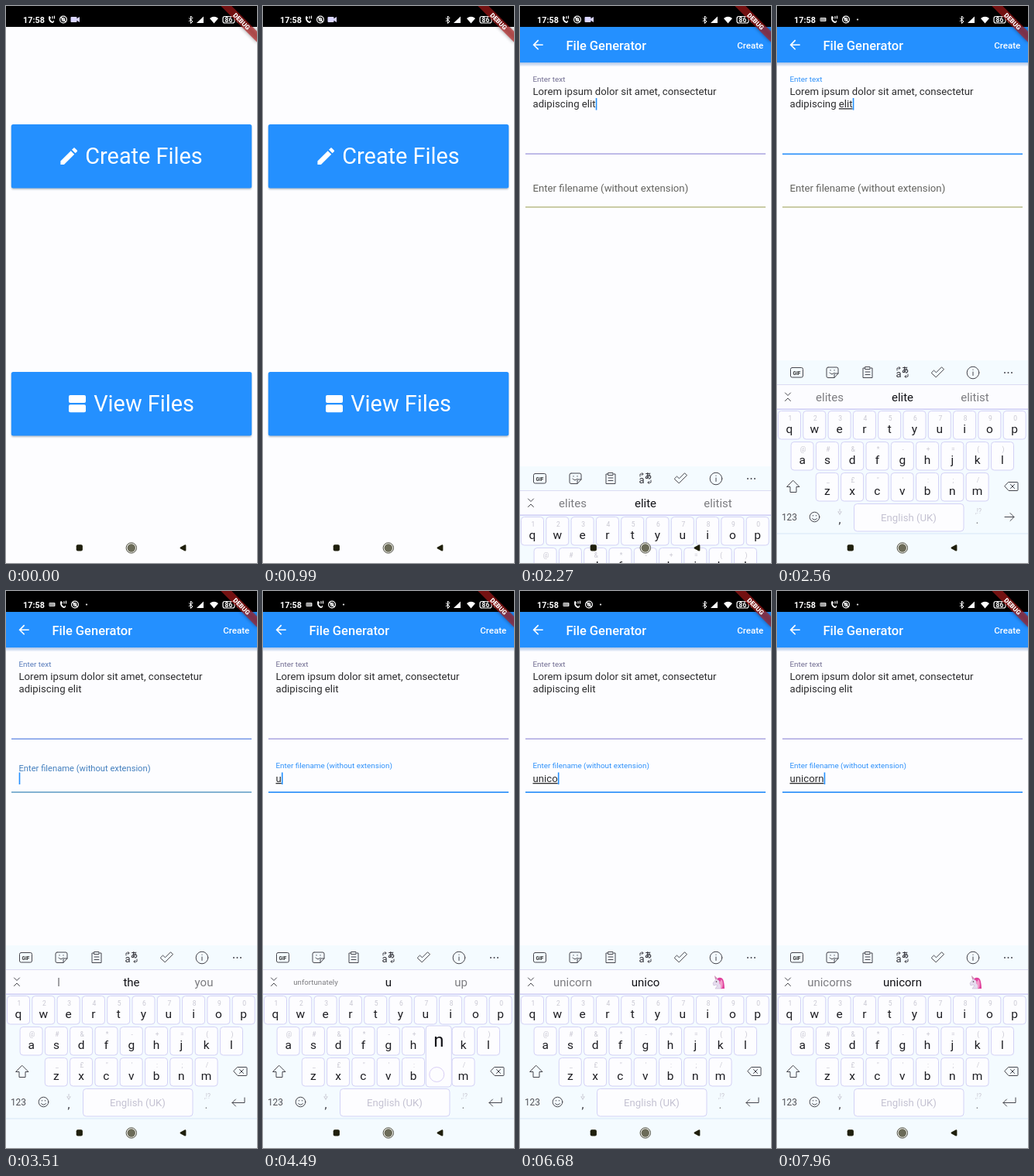
Animation, 324 px wide and 720 px high, one loop 8 s. Source, as an HTML page:

```html
<!DOCTYPE html>
<html lang="en">
<head>
<meta charset="utf-8">
<title>File Generator</title>
<style>
html, body { margin: 0; width: 100%; height: 100%; overflow: hidden; background: #fdfdff; }
svg { display: block; width: 100vw; height: 100vh; font-family: Roboto, "Noto Sans", sans-serif; }
text { white-space: pre; }
.mid { text-anchor: middle; }
.line { fill: none; stroke: #45454c; stroke-width: 1; stroke-linecap: round; stroke-linejoin: round; }
.key { fill: #fdfdff; stroke: #d3d2f6; stroke-width: 1; }
.hint { fill: #c8c7d2; font-size: 8.5px; text-anchor: middle; }
.letter { fill: #1d1d22; font-size: 15.5px; text-anchor: middle; }
.under { text-decoration: underline; text-decoration-thickness: 1px; }
</style>
</head>
<body>
<svg id="stage" viewBox="0 0 324 720" xmlns="http://www.w3.org/2000/svg"></svg>
<script>
const LOOP = 8000;
const BLUE = '#2490ff', PAPER = '#fdfdff';
const PAGE_IN = 2190, KEYS_IN = 2228, FOCUS_TEXT = 2320, COMPOSE = 2420, FOCUS_NAME = 3450;
const STEP_MS = 40, RISE_MS = 145;
const NAME = 'unicorn';
const TYPED = [4250, 4560, 5100, 5650, 6250, 6850, 7520];
const PRESS = 110, SUGGEST_LAG = 80;
const HORN = '*';
const WORDS = [
  ['I', 'the', 'you'], ['unfortunately', 'u', 'up'], ['unfortunately', 'un', 'until'],
  ['unicorn', 'uni', HORN], ['unicorn', 'unic', HORN], ['unicorn', 'unico', HORN],
  ['unicorn', 'unicor', HORN], ['unicorns', 'unicorn', HORN]
];
const ROWS = [
  { x: 16, y: 523, keys: 'qwertyuiop', hints: '1234567890' },
  { x: 32.6, y: 563, keys: 'asdfghjkl', hints: '@#&*-+=()' },
  { x: 64.8, y: 603, keys: 'zxcvbnm', hints: '_£"\':;/' }
];
const PITCH = 32.3;

const at = (x, y, body, s = 1) => `<g transform="translate(${x} ${y}) scale(${s})">${body}</g>`;
const text = (x, y, size, fill, str, more = '') =>
  `<text x="${x}" y="${y}" font-size="${size}" fill="${fill}" ${more}>${str}</text>`;
const rect = (x, y, w, h, fill, r = 0, more = '') =>
  `<rect x="${x}" y="${y}" width="${w}" height="${h}" fill="${fill}" rx="${r}" ${more}/>`;
const line = d => `<path class="line" d="${d}"/>`;
const clamp = v => Math.max(0, Math.min(1, v));
const mix = (a, b, k) => a + (b - a) * k;
const blend = (a, b, k) => `rgb(${a.map((v, i) => Math.round(mix(v, b[i], k)))})`;

function bigButton(y, icon, textX, label) {
  return rect(7, y + 1.5, 310, 82.5, '#7d8793', 2, 'opacity=".55" filter="url(#soft)"') +
    rect(6.8, y, 310.4, 82.5, BLUE, 2.5) + icon +
    text(textX, y + 51, 28.875, '#fff', label);
}

function home() {
  const pencil = '<path fill="#fff" d="M3 17.25V21h3.75L17.81 9.94l-3.75-3.75L3 17.25zM20.71 7.04c.39-.39.39-1.02 0-1.41l-2.34-2.34c-.39-.39-1.02-.39-1.41 0l-1.83 1.83 3.75 3.75 1.83-1.83z"/>';
  const stack = rect(81, 503, 22, 10, '#fff', 2) + rect(81, 515.2, 22, 10, '#fff', 2);
  return bigButton(153, at(66.8, 179.7, pencil, 1.203), 102.3, 'Create Files') +
    bigButton(473, stack, 113.2, 'View Files');
}

function form() {
  const back = '<path fill="#fff" d="M20 11H7.83l5.59-5.59L12 4l-8 8 8 8 1.41-1.41L7.83 13H20v-2z"/>';
  return rect(0, 27, 324, 693, PAPER) +
    rect(0, 73, 324, 5.5, 'url(#shade)') + rect(0, 27, 324, 46, BLUE) +
    at(13.2, 40.3, back, .825) +
    text(59.4, 56.5, 16.5, '#fff', 'File Generator', 'font-weight="500"') +
    text(314.2, 54.5, 11.55, '#fff', 'Create', 'font-weight="500" text-anchor="end"') +
    text(16.5, 98, 9.9, '#000', 'Enter text', 'id="label1"') +
    text(16.5, 115.4, 13.2, '#2c2c2e', 'Lorem ipsum dolor sit amet, consectetur') +
    text(16.5, 131.2, 13.2, '#2c2c2e', 'adipiscing <tspan id="elit">elit</tspan>', 'id="body"') +
    rect(7, 190.5, 310, 1.3, '#000', 0, 'id="rule1"') +
    text(16.5, 240, 13.2, '#000', 'Enter filename (without extension)', 'id="label2"') +
    text(16.5, 247, 13.2, '#2c2c2e', '', 'id="name" class="under"') +
    rect(7, 259.3, 310, 1.3, '#000', 0, 'id="rule2"') +
    rect(0, 0, 1.6, 15.5, BLUE, 0, 'id="caret"');
}

function toolbar() {
  return '<rect class="line" x="17.5" y="467.5" width="16" height="12.5" rx="2"/>' +
    text(25.5, 476.6, 6.5, '#333', 'GIF', 'class="mid" font-weight="700"') +
    line('M66 467h11q2 0 2 2v6l-5 5.5h-8q-2 0-2-2v-9.5q0-2 2-2M79 475h-4q-1 0-1 1v4.5M68 474q3 4 6 0M69 470.5v.6M74 470.5v.6') +
    line('M113 468h-2v12.5h12v-12.5h-2M114 466.5h6v3h-6zM114 473h6M114 476.5h6') +
    text(153.5, 480, 13, '#33333a', 'a') +
    text(161, 473.5, 9, '#33333a', 'あ', 'font-family="Noto Sans CJK JP, Roboto, sans-serif" font-weight="700"') +
    line('M155 471v-3h4M157.5 466.5l1.5 1.5-1.5 1.5M169 476v3h-4M166.5 477.5l-1.5 1.5 1.5 1.5') +
    line('M199.5 474l3-3 3 2.8 7-7 3 2.8-10 10z') +
    '<circle class="line" cx="253" cy="474" r="7.8"/>' + line('M253 473v4.5M253 470v.3') +
    [294, 298.5, 303].map(x => `<circle cx="${x}" cy="474" r="1" fill="#45454c"/>`).join('');
}

function keyCap(x, y, letter, hint) {
  return `<rect class="key" x="${x - 14.5}" y="${y + .5}" width="29" height="36.5" rx="4"/>` +
    `<text class="hint" x="${x + 1}" y="${y + 13}">${hint.replace('&', '&amp;')}</text>` +
    `<text class="letter" x="${x}" y="${y + 29}">${letter}</text>`;
}

function unicorn() {
  return '<g transform="translate(256 506) scale(-1 1)">' +
    '<path fill="#e6dcef" stroke="#b9a6c8" stroke-width=".5" d="M-2-5L3-4 7 1 6 4 3 3 1 4 4 8H-5z"/>' +
    '<path fill="#e0409c" d="M0-6Q-6-7-7-1-8 4-8 8H-3Q-5 3-1 1-3-2 2-4z"/>' +
    '<path fill="#f29ac9" d="M-4-4Q-7 0-5 7L-3 8Q-4 3-1 1z"/>' +
    '<path fill="#c98ab0" d="M1-5L5-9 4-4z"/><circle cx="2.5" cy="-1" r=".8" fill="#433"/></g>';
}

function keyboard() {
  const keys = ROWS.map(r => [...r.keys].map((k, i) => keyCap(r.x + PITCH * i, r.y, k, r.hints[i])).join('')).join('');
  return rect(0, 458, 324, 600, '#f4fbff') +
    rect(0, 490, 324, 31, '#fcfcff') +
    rect(0, 489, 324, 1, '#dcdcf3') + rect(0, 520.5, 324, 1.3, '#c9c6f3') +
    toolbar() + line('M10.5 500l3.5 3.5 3.5-3.5M10.5 510.5l3.5-3.5 3.5 3.5') +
    [68, 162, 255.5].map((x, i) => text(x, 0, 15, i === 1 ? '#111116' : '#7c7c80', '', `id="word${i}" class="mid"`)).join('') +
    `<g id="horn">${unicorn()}</g>` + keys +
    line('M21 613.5l8 8h-4v7h-8v-7h-4z') +
    line('M299 615.5h11q1 0 1 1v9q0 1-1 1h-11l-5-5.5zM301.5 618.5l5 5M306.5 618.5l-5 5') +
    text(16, 665, 12, '#505056', '123', 'class="mid"') +
    '<circle class="line" cx="48.5" cy="660.5" r="6.3"/>' + line('M45.5 662.5q3 3.5 6 0M46.5 658.5v.5M50.5 658.5v.5') +
    '<path d="M81 650v4M79 653q0 3 2 3t2-3M81 656v2" fill="none" stroke="#c8c7d2"/>' +
    text(81, 669, 15, '#33333a', ',', 'class="mid"') +
    '<rect class="key" x="99.5" y="643.5" width="141.5" height="35.5" rx="4"/>' +
    text(170, 665.5, 13.2, '#c4c2d2', 'English (UK)', 'class="mid"') +
    '<text class="hint" x="260" y="656">,!?</text>' + text(258.5, 669, 15, '#77777d', '.', 'class="mid"') +
    `<g id="next">${line('M294 660.5h12M301 655.5l5 5-5 5')}</g>` +
    `<g id="enter">${line('M308 655v6.5h-16M296.5 657l-4.5 4.5 4.5 4.5')}</g>` +
    rect(0, 681.5, 324, 1, '#d8e8f8') +
    '<g id="popup"><rect class="key" x="-16.5" y="-41" width="33" height="79" rx="4"/>' +
    '<circle cx="-2.5" cy="22" r="9.5" fill="#fdfdff" stroke="#d9cff6"/>' +
    '<text id="pressed" class="mid" y="-14" font-size="24" fill="#111116"></text></g>';
}

function statusBar() {
  const ink = 'fill="none" stroke="#fff" stroke-width="1.2" stroke-linecap="round"';
  const call = '<path fill="none" stroke="#fff" stroke-width="1.9" stroke-linecap="round" d="M-3-3.2q-.5 5.5 4 6.700"/>' +
    `<path ${ink} d="M-2.500-3.500l1 1.500M2 3.500l.500-1.700M1-4v2.500M3.500-4.500v3"/>`;
  const swirl = `<circle r="4.4" ${ink}/><circle r="1.8" ${ink}/><path ${ink} d="M-3-3L3 3"/>`;
  const cam = rect(-5.5, -3.5, 8, 7, '#d9d5ff', 1) + '<path fill="#d9d5ff" d="M2-1l4-2.5v7L2 1z"/>';
  const board = rect(-4, -2.5, 8, 5, '#d8d8d8', 1) + '<path stroke="#111" stroke-dasharray="1 1" d="M-3-.8h6M-3 .9h6"/>';
  return rect(0, 0, 324, 27, '#000') +
    text(22, 21.8, 10.8, '#fff', '17:58', 'font-weight="700"') +
    `<g id="idle">${at(59, 17.5, call) + at(74, 17.5, swirl) + at(89, 17.5, cam)}</g>` +
    `<g id="typing">${at(59.5, 17.5, board) + at(74, 17.5, call) + at(89, 17.5, swirl)}<circle cx="104" cy="17.5" r="1.1" fill="#fff"/></g>` +
    '<path fill="none" stroke="#fff" d="M236 15.5l5 4.5-2.5 2.5v-9.5l2.500 2.500-5 4.500"/>' +
    '<path fill="#fff" d="M246 22h9v-8.5zM268.5 22.5l-5.5-6.5q5.5-4.5 11 0z"/>' +
    `<rect x="280" y="13.5" width="15" height="8.5" rx="2.5" ${ink}/>` +
    text(287.5, 21, 8.5, '#fff', '86', 'class="mid" font-weight="700"') +
    '<path fill="#fff" d="M300 13l-3 5h2l-1 4 4-5.5h-2.5z"/>';
}

function navigation() {
  return rect(90.7, 696.3, 8.2, 8.2, '#1f1f0c', 2) +
    '<circle cx="161.8" cy="700.5" r="6.7" fill="#f4f4f0" stroke="#4c4c40"/>' +
    '<circle cx="161.8" cy="700.5" r="5.2" fill="#6b6b58"/>' +
    '<path d="M225.7 700.5l5.600-3v6z" fill="#1f1f0c" stroke="#1f1f0c" stroke-width="2.2" stroke-linejoin="round"/>';
}

function ribbon() {
  return '<g transform="translate(324 0) rotate(45)">' +
    rect(-33, 23.1, 66, 9.9, '#000', 0, 'opacity=".42" filter="url(#haze)"') +
    rect(-33, 23.1, 66, 9.9, '#b71c1c', 0, 'opacity=".63"') +
    text(0, 31, 8.4, '#fff', 'DEBUG', 'class="mid" font-weight="900"') + '</g>';
}

const stage = document.getElementById('stage');
stage.innerHTML =
  '<defs><filter id="soft" x="-10%" y="-30%" width="120%" height="160%"><feGaussianBlur stdDeviation="1"/></filter>' +
  '<filter id="haze" x="-20%" y="-100%" width="140%" height="300%"><feGaussianBlur stdDeviation="2.4"/></filter>' +
  '<linearGradient id="shade" x2="0" y2="1"><stop stop-color="#b0c6e6"/><stop offset=".6" stop-color="#dbe4f4"/><stop offset="1" stop-color="#fdfdff"/></linearGradient></defs>' +
  rect(0, 0, 324, 720, PAPER) + `<g id="home">${home()}</g><g id="form">${form()}</g>` +
  `<g id="keyboard">${keyboard()}</g>` + statusBar() + navigation() + ribbon();

const el = {};
stage.querySelectorAll('[id]').forEach(n => el[n.id] = n);
const set = (id, attrs) => Object.entries(attrs).forEach(([k, v]) => el[id].setAttribute(k, v));
const show = (id, on) => set(id, { visibility: on ? 'visible' : 'hidden' });

function put(id, str) {
  if (el[id].textContent !== str) el[id].textContent = str;
}

function keyPlace(letter) {
  const row = ROWS.find(r => r.keys.includes(letter));
  return [row.x + PITCH * row.keys.indexOf(letter), row.y];
}

function drawFields(t, count) {
  const one = clamp((t - FOCUS_TEXT) / 90) * (1 - clamp((t - FOCUS_NAME) / 100));
  const two = clamp((t - FOCUS_NAME) / 100);
  const blue = [46, 145, 250];
  set('label1', { fill: blend([112, 108, 145], blue, one) });
  set('rule1', { fill: blend([150, 143, 217], blue, one), height: mix(1.2, 1.7, one) });
  set('label2', { fill: blend([100, 100, 96], blue, two), y: mix(240, 229.2, two), 'font-size': mix(13.2, 9.9, two) });
  set('rule2', { fill: blend([176, 179, 119], blue, two), height: mix(1.3, 1.7, two) });
  set('elit', { class: t >= COMPOSE && t < FOCUS_NAME ? 'under' : '' });
  put('name', NAME.slice(0, count));

  const naming = t >= FOCUS_NAME;
  const since = count ? TYPED[count - 1] : naming ? FOCUS_NAME : PAGE_IN;
  const width = el[naming ? 'name' : 'body'].getComputedTextLength();
  set('caret', { x: 16.7 + width, y: naming ? 234.5 : 119 });
  show('caret', t >= PAGE_IN && (t - since) % 1000 < 520);
}

function drawWords(t) {
  const known = TYPED.filter(k => k + SUGGEST_LAG <= t).length;
  const words = t < FOCUS_NAME ? ['elites', 'elite', 'elitist'] : WORDS[known];
  words.forEach((w, i) => {
    const id = 'word' + i;
    put(id, w === HORN ? '' : w);
    set(id, { 'font-size': 15 });
    const wide = el[id].getComputedTextLength();
    const size = wide > 58 ? 15 * 57.5 / wide : 15;
    set(id, { 'font-size': size, y: 505.4 + .35 * size });
  });
  show('horn', words[2] === HORN);
}

function drawPress(t) {
  const i = TYPED.findIndex(k => t >= k - PRESS && t < k);
  show('popup', i >= 0);
  if (i < 0) return;
  const [x, y] = keyPlace(NAME[i]);
  set('popup', { transform: `translate(${x + .5} ${y})` });
  put('pressed', NAME[i]);
}

function draw(t) {
  const page = clamp((t - PAGE_IN) / 70);
  const slid = Math.floor((t - KEYS_IN) / STEP_MS) * STEP_MS;
  const rise = (1 - clamp(slid / RISE_MS)) ** 2;
  set('form', { opacity: page, transform: `translate(0 ${70 * (1 - page) ** 2})` });
  set('keyboard', { transform: `translate(0 ${Math.round(262 * rise)})` });
  show('idle', t < 2390);
  show('typing', t >= 2390);
  show('next', t < FOCUS_NAME);
  show('enter', t >= FOCUS_NAME);
  drawFields(t, TYPED.filter(k => k <= t).length);
  drawWords(t);
  drawPress(t);
}

function tick() {
  draw(performance.now() % LOOP);
  requestAnimationFrame(tick);
}
tick();
</script>
</body>
</html>
```
